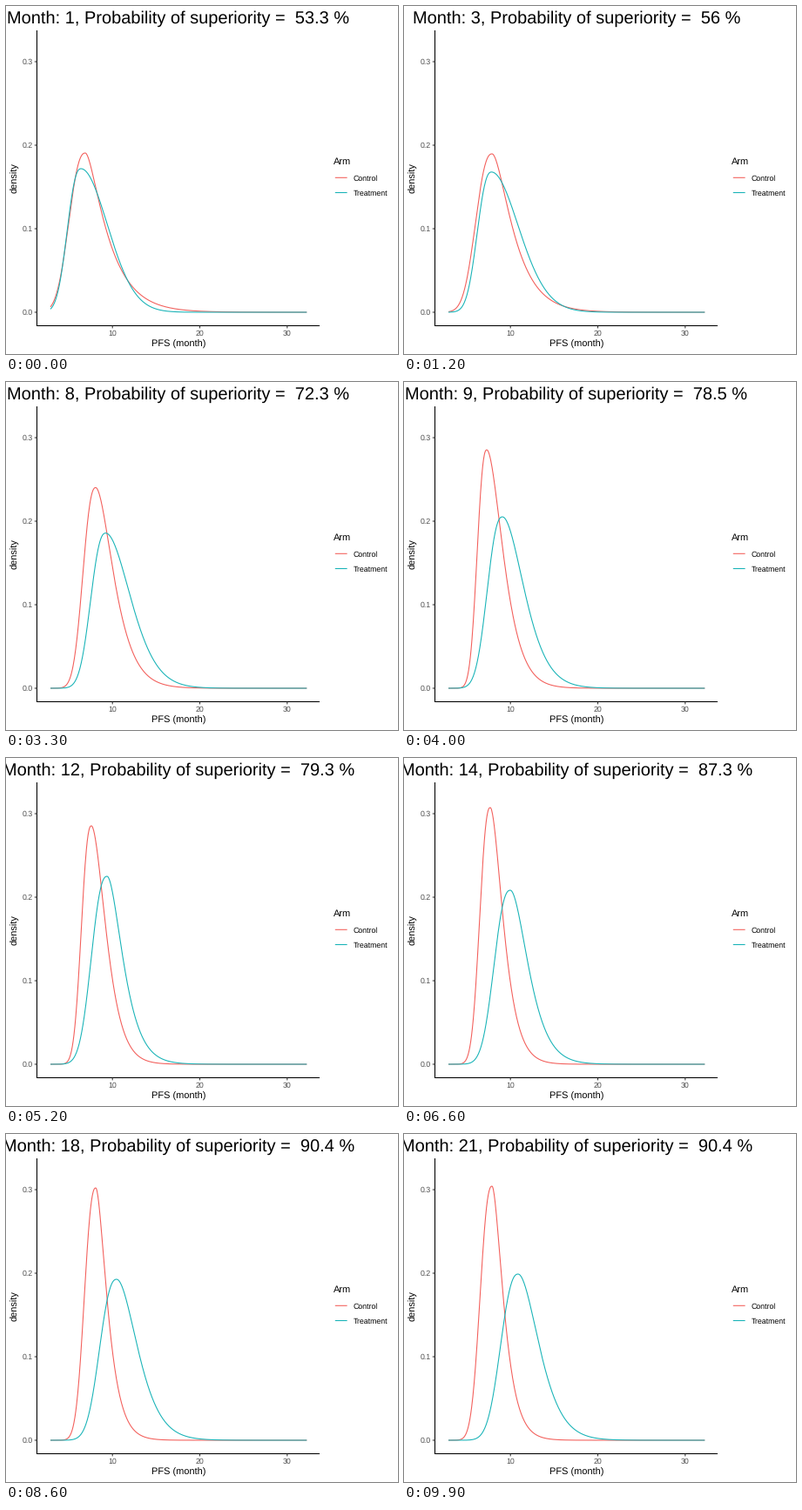
A matplotlib script for the animation above (10000 ms loop, 450 by 400 pixels).

```python
import numpy as np
import matplotlib.pyplot as plt
from matplotlib.animation import FuncAnimation

W, H, DPI = 450, 400, 100
FRAMES, STEP = 100, 100
PT = 72 / DPI  # points per pixel
RED, TEAL = "#F35E5A", "#17B3B7"
BASE = 352     # pixel row of density 0
GRID = np.linspace(51, 345.3, 600)

plt.rcParams.update({"font.family": "Liberation Sans", "text.hinting": "none"})

# Each trait of a bell runs straight between a few (times, values)
KEYS = [0, 25, 40, 52, 66, 86, 99]
CONTROL = dict(
    mode=(KEYS, [91, 112, 95, 98, 99, 103, 101]),
    peak=(KEYS, [183, 181, 274, 274, 295, 290, 292]),
    left=([25, 40, 99], [18, 10.5, 13]),
    right=([0, 25, 80], [12.3, 16.4, 9]),
    tail=([0, 45], [12, 5]),
)
TREATMENT = dict(
    mode=(KEYS, [86, 116, 113, 116, 122, 127, 131]),
    peak=(KEYS, [165, 157, 197, 216, 200, 185, 191]),
    left=([0, 99], [15, 19.2]),
    right=([25, 52, 86], [30, 13.5, 19.5]),
    tail=([0, 45], [1, 6]),
)
# Probability of superiority by month
PROB = ([1, 3, 6, 9, 11, 12, 14, 18, 21],
        [53.3, 56, 59.9, 78.5, 79.1, 79.3, 87.3, 90.4, 90.4])


def bell(traits, frame):
    """Skewed bell: steep foot on the left, widening tail on the right."""
    v = {k: np.interp(frame, *path) for k, path in traits.items()}
    lo = np.maximum(v["mode"] - GRID, 0)
    hi = np.maximum(GRID - v["mode"], 0)
    drop = (lo / v["left"]) ** 2.4 + hi**2 / (v["right"] ** 2 + v["tail"] * hi)
    return BASE - v["peak"] * np.exp(-drop / 2)


fig = plt.figure(figsize=(W / DPI, H / DPI), dpi=DPI, facecolor="white")
ax = fig.add_axes([0, 0, 1, 1])
ax.set(xlim=(0, W), ylim=(H, 0))
ax.axis("off")


def line(xs, ys, color):
    return ax.plot(xs, ys, color=color, lw=1.07 * PT, snap=False,
                   solid_capstyle="butt", solid_joinstyle="round")[0]


def label(x, y, s, size, color="black", **kw):
    return ax.text(x, y, s, fontsize=size * PT, color=color,
                   va="baseline", **kw)


curves = [(line(GRID, GRID * 0 + BASE, color), traits)
          for color, traits in ((RED, CONTROL), (TEAL, TREATMENT))]

line([35.5, 35.5], [28, 368], "black")
line([35, 360], [367.5, 367.5], "black")
for k in range(4):
    y = BASE - 96 * k
    line([32.8, 35.5], [y, y], "#333333")
    label(31, y + 3.2, f"{k / 10:.1f}", 8.8, "#4D4D4D", ha="right")
for v in (10, 20, 30):
    x = 21.9 + 10.03 * v
    line([x, x], [367.5, 370.4], "#333333")
    label(x, 378.7, str(v), 8.8, "#4D4D4D", ha="center")
label(198, 392, "PFS (month)", 11, ha="center")
label(13.5, 198, "density", 11, ha="center",
      rotation=90, rotation_mode="anchor")

label(376, 182, "Arm", 11)
for y, name, color in ((197.3, "Control", RED), (214.5, "Treatment", TEAL)):
    line([377.8, 391.6], [y, y], color)
    label(398.6, y + 3.4, name, 8.8)

title = label(197.8, 20, "", 20, ha="center")


def update(frame):
    month = round(1 + 20 * frame / (FRAMES - 1))
    prob = round(np.interp(month, *PROB), 1)
    title.set_text(f"Month: {month}, Probability of superiority =  {prob:g} %")
    for curve, traits in curves:
        curve.set_ydata(bell(traits, frame))
    return [title] + [curve for curve, _ in curves]


anim = FuncAnimation(fig, update, frames=FRAMES, interval=STEP,
                     repeat=True, repeat_delay=0, blit=False)
plt.show()
```
